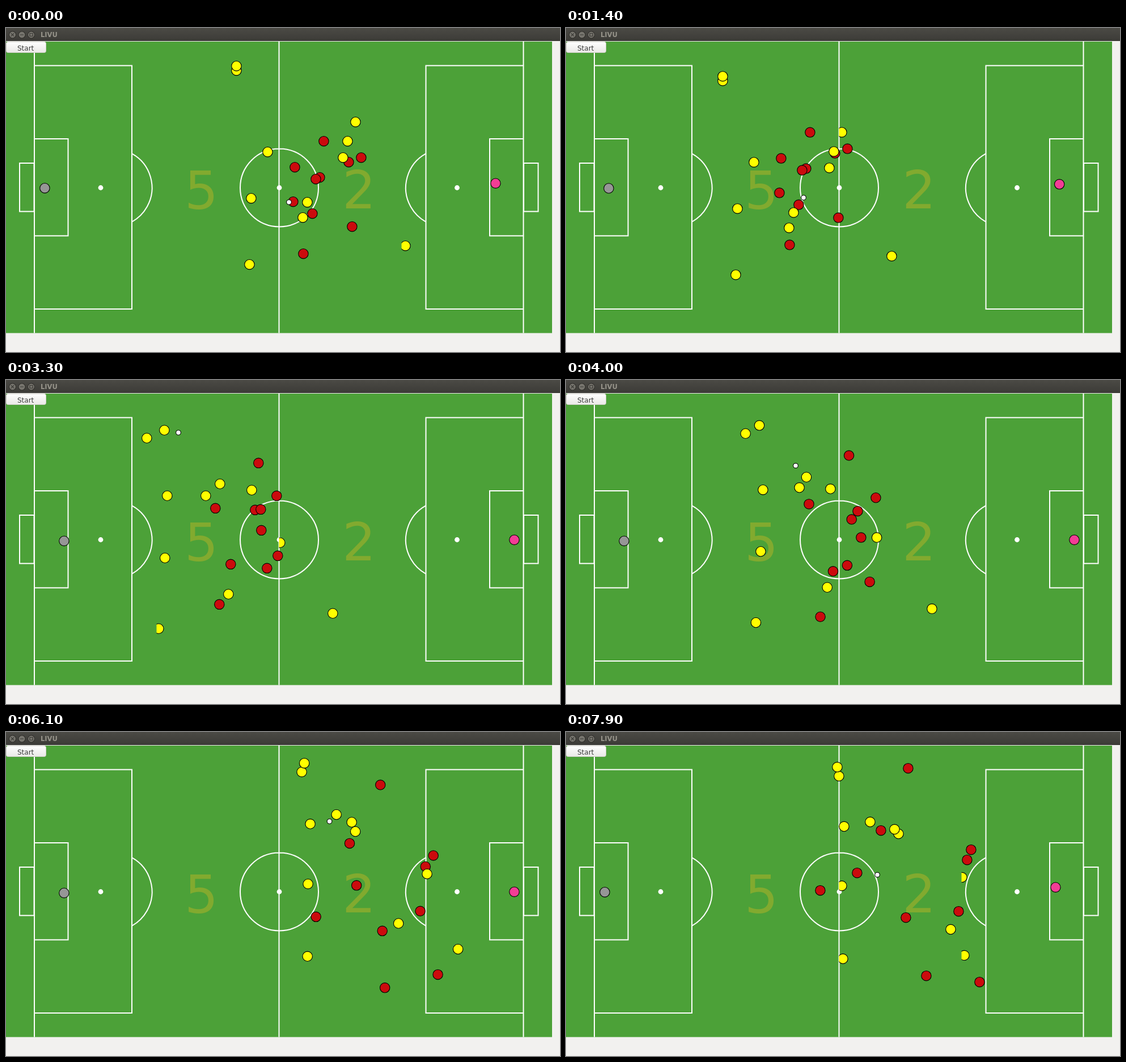
Animation of 977x573 px, one loop 8 s. Source, as an HTML page with a canvas:

```html
<!DOCTYPE html>
<html lang="en">
<head>
<meta charset="utf-8">
<title>Football</title>
<style>
  html, body { margin: 0; width: 100%; height: 100%; overflow: hidden; background: #f2f1ef; }
  canvas { display: block; }
</style>
</head>
<body>
<canvas id="stage" width="977" height="573"></canvas>
<script>
const ctx = document.getElementById('stage').getContext('2d');
const LOOP = 8000, STEP = 100;

// Linear interpolation through points [t, ...values], held at both ends.
function at(points, t) {
  const i = points.findIndex(p => p[0] > t);
  if (i < 0) return points[points.length - 1].slice(1);
  if (i === 0) return points[0].slice(1);
  const a = points[i - 1], b = points[i], k = (t - a[0]) / (b[0] - a[0]);
  return a.slice(1).map((v, j) => v + (b[j + 1] - v) * k);
}

// Everyone runs up and down the pitch together, turning when possession changes.
const RUN = [[0, 0], [1320, -138], [1530, -117], [2650, -222], [6780, 165], [7900, 58]];
// The keepers step out of goal (0 = home, 1 = out).
const STEP_OUT = [[1310, 0], [1530, 0.5], [1740, 0], [2670, 0], [3000, 1], [6950, 1], [7290, 0]];
const BALL = [[0, 499, 308], [1400, 419, 300], [3300, 304, 93], [4000, 405, 151.5],
  [5300, 510, 151.5], [6900, 631, 164.5], [7900, 549, 252.5]];

// Each team drifts sideways as it runs; a player's place in the formation
// shifts slowly between a few poses.
const RED = { color: '#cb0b0d', drift: 0.12 };
const YELLOW = { color: '#ffff00', drift: -0.14 };
const actors = [];

function player(team, ...poses) {
  const times = poses.length > 3 ? [1400, 3300, 5300, 6900] : [1400, 3300, 6900];
  const path = poses.map((p, i) => [times[i], ...p]);
  actors.push({
    color: team.color,
    place(t) {
      const [x, y] = at(path, t), [run] = at(RUN, t);
      return [x + run, y + run * team.drift];
    }
  });
}

function keeper(color, x, y, dx, dy) {
  actors.push({
    color,
    place(t) {
      const [k] = at(STEP_OUT, t);
      return [x + dx * k, y + dy * k];
    }
  });
}

// Back to front.
player(RED, [560, 200], [606, 166], [545, 57]);
player(RED, [509, 246], [530, 246], [497, 167]);
player(RED, [604, 237], [611, 285], [634, 310]);
player(RED, [626, 229], [638, 224], [656, 201]);
player(RED, [553, 264], [600, 249], [649, 219]);
player(RED, [540, 328], [557, 345], [583, 358], [541, 321]);
player(RED, [610, 351], [621, 352], [671, 435]);
player(RED, [524, 399], [537, 416], [556, 456], [577, 424]);

player(YELLOW, [406, 75], [409, 80], [423, 86]);
player(YELLOW, [406, 67], [440, 66], [420, 70]);
player(YELLOW, [461, 219], [445, 182], [432, 175]);
player(YELLOW, [602, 200], [538, 161], [484, 153], [478, 167]);
player(YELLOW, [616, 166], [594, 172], [501, 192], [528, 188]);
player(YELLOW, [594, 229], [513, 182], [495, 167], [521, 180]);
player(YELLOW, [432, 301], [441, 292], [428, 280]);
player(YELLOW, [523, 335], [553, 356], [561, 348], [620, 357]);
player(YELLOW, [531, 308], [644, 265], [640, 265]);
player(YELLOW, [429, 418], [430, 417], [430, 409]);
player(YELLOW, [704, 385], [737, 390], [747, 393], [644, 403]);

player(RED, [546, 267], [610, 248], [578, 276], [455, 242]);
player(RED, [506, 307], [640, 330], [500, 356], [390, 273]);

keeper('#969696', 68, 283, 34, 1.5);
keeper('#f23d95', 863, 274.5, 33, 8);

function disc(x, y, r, fill, stroke) {
  ctx.beginPath();
  ctx.arc(x, y, r, 0, 7);
  ctx.fillStyle = fill;
  ctx.fill();
  if (stroke) {
    ctx.strokeStyle = stroke;
    ctx.lineWidth = 1.1;
    ctx.stroke();
  }
}

function text(str, x, y, font, color) {
  ctx.font = font + ' "DejaVu Sans", sans-serif';
  ctx.fillStyle = color;
  ctx.fillText(str, x, y);
}

function shade(y0, y1, from, to) {
  const g = ctx.createLinearGradient(0, y0, 0, y1);
  g.addColorStop(0, from);
  g.addColorStop(1, to);
  return g;
}

function drawTitleBar() {
  ctx.fillStyle = shade(0, 23, '#4b4a45', '#3c3b37');
  ctx.fillRect(0, 0, 977, 23);
  ctx.fillStyle = '#32312e';
  ctx.fillRect(0, 22, 977, 1);
  for (const x of [11.5, 28, 44.5]) disc(x, 12, 6, '#77756e', '#33322e');
  ctx.strokeStyle = '#393834';
  ctx.lineWidth = 1.2;
  ctx.beginPath();
  ctx.moveTo(9, 9.5); ctx.lineTo(14, 14.5);
  ctx.moveTo(14, 9.5); ctx.lineTo(9, 14.5);
  ctx.moveTo(25, 12); ctx.lineTo(31, 12);
  ctx.rect(42, 9.5, 5, 5);
  ctx.stroke();
  text('LIVU', 61, 16, 'bold 11.5px', '#96938a');
}

// One half of the markings, from the left goal to the halfway line.
function drawHalf() {
  ctx.beginPath();
  ctx.moveTo(50, 24);
  ctx.lineTo(50, 539.5);
  ctx.rect(50, 66.5, 172, 430.5);
  ctx.rect(50, 196, 59.5, 171.5);
  ctx.rect(24, 239, 25.5, 85.5);
  ctx.stroke();
  const half = Math.acos(33.5 / 69);
  ctx.beginPath();
  ctx.arc(188.5, 282.5, 69, -half, half);
  ctx.stroke();
  disc(167, 282.5, 4.4, '#fff');
}

function drawPitch() {
  ctx.fillStyle = '#4ca138';
  ctx.fillRect(0, 24, 963, 515.5);
  text('5', 315, 320, '93px', '#82aa2f');
  text('2', 593, 319, '93px', '#82aa2f');

  ctx.strokeStyle = '#fff';
  ctx.lineWidth = 2;
  drawHalf();
  ctx.save();
  ctx.translate(962.5, 0);
  ctx.scale(-1, 1);
  drawHalf();
  ctx.restore();

  ctx.beginPath();
  ctx.moveTo(481.5, 24);
  ctx.lineTo(481.5, 539.5);
  ctx.moveTo(551, 282.5);
  ctx.arc(482, 282.5, 69, 0, 2 * Math.PI);
  ctx.stroke();
  disc(482, 282.5, 4.4, '#fff');
}

function drawButton() {
  ctx.fillStyle = shade(24, 44, '#ffffff', '#e9e8e6');
  ctx.strokeStyle = '#cfcdc8';
  ctx.lineWidth = 1;
  ctx.beginPath();
  ctx.roundRect(0.5, 24.5, 70, 19, 3);
  ctx.fill();
  ctx.stroke();
  text('Start', 20, 40, '12px', '#3c3c3c');
}

// A disc just past a repaint seam loses the part left of it.
function drawActor(x, y, color) {
  const seam = 49 + 216 * Math.floor((x - 49) / 216);
  ctx.save();
  if (x > seam + 0.5 && x - 9 < seam) {
    ctx.beginPath();
    ctx.rect(seam + 0.5, 0, 30, 573);
    ctx.clip();
  }
  disc(x + 0.4, y + 0.2, 8.7, color, '#000');
  ctx.restore();
}

function frame(now) {
  const t = Math.floor(now % LOOP / STEP) * STEP;
  ctx.fillStyle = '#f2f1ef';
  ctx.fillRect(0, 0, 977, 573);
  drawTitleBar();
  drawPitch();
  drawButton();
  for (const a of actors) drawActor(...a.place(t), a.color);
  disc(...at(BALL, t), 4.3, '#fff', '#000');
  requestAnimationFrame(() => frame(performance.now()));
}
frame(0);
</script>
</body>
</html>
```
